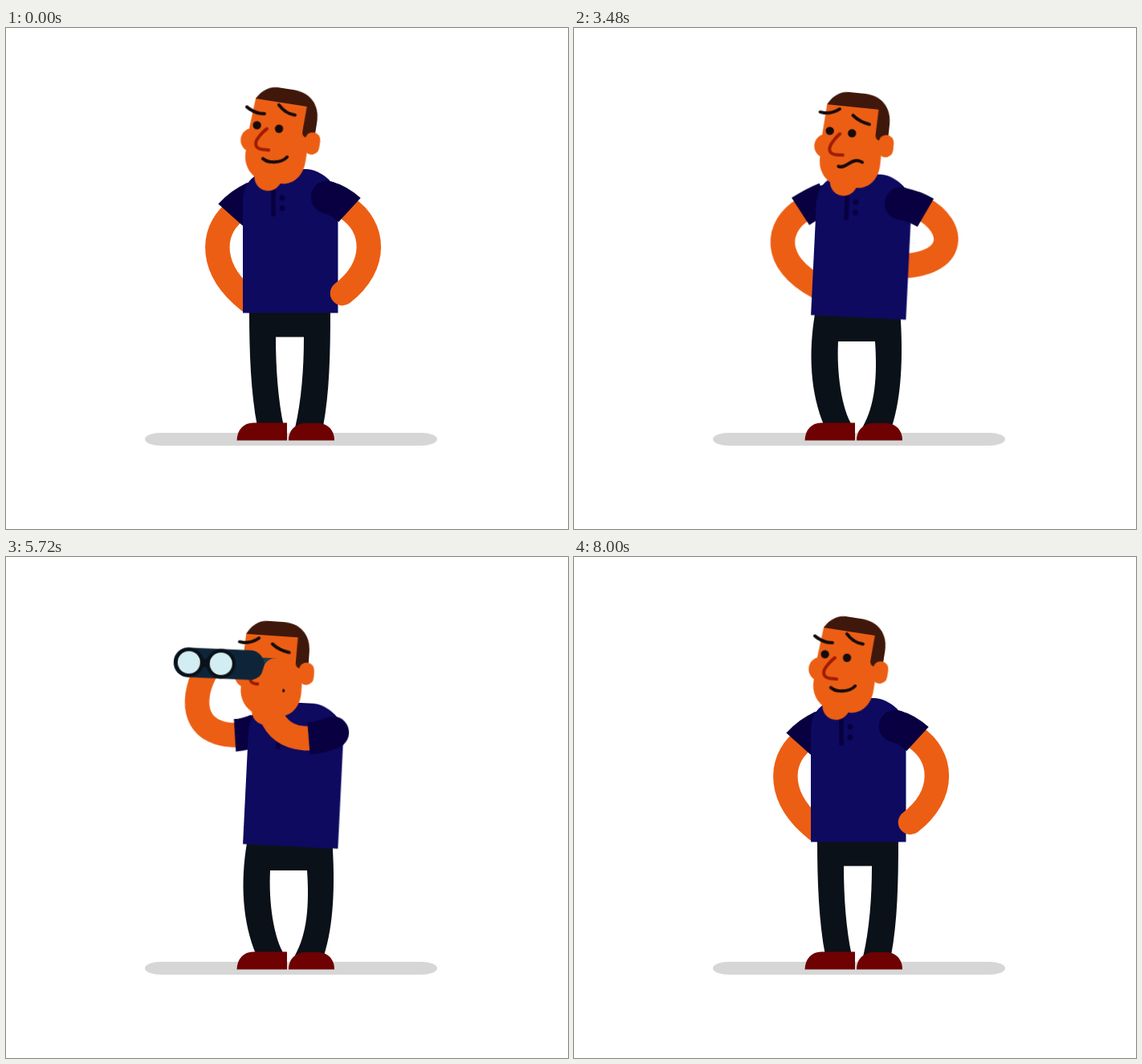
Write an HTML page without scripts that moves like this. It is 700x625 px and loops after 8480 ms.

```html
<!DOCTYPE html>
<html lang="en">
<head>
<meta charset="utf-8">
<title>Looking out</title>
<style>
html, body { margin: 0; width: 100%; height: 100%; overflow: hidden; background: #fff; }
svg { display: block; width: 700px; height: 625px; }

.skin { fill: #ec5e14; }
.limb { fill: none; stroke: #ec5e14; stroke-width: 30.5; stroke-linecap: round; }
.cuff { fill: none; stroke: #080040; stroke-width: 40.5; }
.navy { fill: #0d0a60; }
.dark { fill: #080040; }
.shoe { fill: #6e0202; }
.line { fill: none; stroke: #160b0b; stroke-width: 4; stroke-linecap: round; stroke-linejoin: round; }

/* one shared clock */
.torso, .legs, .head, .armL, .armR, .cuffL, .cuffR, .browL, .browR, .mouth, .bino, .pupils {
  animation: 8.48s ease-in-out infinite;
}
.front, .back, .binoFront, .binoBack, .eyes, .open, .shut { animation: 8.48s step-end infinite; }

.torso { transform-origin: 354px 355.5px; animation-name: torso; }
.legs { animation-name: legs; }
.head { animation-name: head; }
.armL { animation-name: armL; }
.armR { animation-name: armR; }
.cuffL { animation-name: cuffL; }
.cuffR { animation-name: cuffR; }
.browL { animation-name: browL; }
.browR { animation-name: browR; }
.mouth { animation-name: mouth; }
.bino { animation-name: bino; }
.pupils { animation-name: pupils; }
.front { animation-name: front; }
.back { animation-name: back; }
.binoFront { animation-name: binoFront; }
.binoBack { animation-name: binoBack; }
.eyes { animation-name: eyes; }
.open { animation-name: open; }
.shut { animation-name: shut; }

@keyframes torso {
  0%, .3%, 93.9%, 100% { transform: translate(0, 0) rotate(0deg); }
  8%, 11%, 26.4%, 82% { transform: translate(0, 5.5px) rotate(2.8deg); }
  14.9%, 21% { transform: translate(0, 5.5px) rotate(.9deg); }
}
@keyframes legs {
  0%, .3%, 93.9%, 100% { d: path("M303 353C303 405 305 455 313 497L346 497C339 465 336 425 336 385.5L371 385.5C371 425 368 465 360 499L395 497C403 455 404 405 404 353Z"); }
  8%, 82% { d: path("M300 357C292 405 294 455 312 497L347 497C333 475 327 430 329 391L375 391C378 435 375 470 360 497L396 497C408 460 410 410 406.5 357Z"); }
}
@keyframes head {
  0%, .3%, 93.9%, 100% { transform: translate(325.9px, 186.5px) rotate(8.9deg); }
  8%, 10.6%, 26.4%, 34% { transform: translate(324.5px, 193.3px) rotate(2.7deg); }
  14.6%, 20.8% { transform: translate(319.9px, 197.9px) rotate(-8deg); }
  43%, 49% { transform: translate(336.5px, 192.7px) rotate(6.2deg); }
  55.6%, 62% { transform: translate(322.5px, 193.3px) rotate(2.7deg); }
  75%, 82% { transform: translate(322.7px, 191.7px) rotate(6.1deg); }
}
@keyframes armL {
  0%, .3%, 93.9%, 100% { d: path("M284 230C254 256 254 302 302 340"); }
  8%, 47%, 90.5% { d: path("M280 224C246 246 242 292 302 320"); }
  51.4%, 86% { d: path("M278 224C232 240 222 270 244 262"); animation-timing-function: linear; }
  53.8%, 84.4% { d: path("M279 222C222 232 218 200 238 190"); animation-timing-function: ease-out; }
  55.7%, 82.1% { d: path("M282 220C220 224 222 170 241 138"); }
}
@keyframes cuffL {
  0%, .3%, 93.9%, 100% { d: path("M308 212Q292 219 279.5 233"); }
  8%, 47%, 90.5% { d: path("M306 209Q291 216 275.7 227"); }
  55.7%, 82.1% { d: path("M306 212Q292 219 278.4 220.5"); }
}
@keyframes armR {
  0%, .3%, 93.9%, 100% { d: path("M424 224C460 248 464 296 419 331"); }
  8%, 32% { d: path("M426 219C467 240 471 288 419 319"); }
  37.2%, 91.5% { d: path("M428 213C480 225 504 280 440 305"); animation-timing-function: linear; }
  40.6%, 42.9%, 89.6% { d: path("M427 216C470 235 480 290 385 290"); }
  46.2% { d: path("M428 209C470 208 505 250 475 300"); }
  48.6% { d: path("M428 211C468 216 496 262 465 309"); }
  51.4%, 85.8% { d: path("M412 232C446 262 440 292 398 277"); animation-timing-function: linear; }
  53.8%, 84.4% { d: path("M394 234C385 268 345 262 335 215"); animation-timing-function: ease-out; }
  55.7%, 82.1% { d: path("M377 219C339 225 305 201 325 137"); }
  87.7% { d: path("M426 216C470 222 490 262 457 288"); }
}
@keyframes cuffR {
  0%, .3%, 93.9%, 100% { d: path("M400 211Q415 215 428 227"); }
  8%, 32%, 40.6%, 42.9%, 89.6% { d: path("M400 211Q417 213.5 431.5 221"); }
  46.2%, 48.6% { d: path("M400 211Q417 208 433 211.5"); }
  51.4%, 85.8% { d: path("M400 211Q411 224 414 238"); animation-timing-function: linear; }
  53.8%, 84.4% { d: path("M400 211Q400 226 390 240"); animation-timing-function: ease-out; }
  55.7%, 82.1% { d: path("M400 211Q386 218 370.4 220"); }
  87.7% { d: path("M400 211Q417 210 432 217"); }
}
@keyframes browL {
  0%, .3%, 93.9%, 100% { d: path("M-9.2 12Q2 19 13.8 17"); }
  8%, 10.6%, 26.4%, 82% { d: path("M-7.5 10.4Q5.6 12.7 16.2 4.2"); }
  14.6%, 20.8% { d: path("M-5.8 19.4Q10 21.6 17.2 14"); }
}
@keyframes browR {
  0%, .3%, 93.9%, 100% { d: path("M29.9 3.4Q39.5 13 51.6 12.7"); }
  8%, 10.6%, 26.4%, 82% { d: path("M33.5 10.4Q43 18 55 19.4"); }
  14.6%, 20.8% { d: path("M33 2.6Q41 10.8 54 11.1"); }
}
@keyframes mouth {
  0%, .3%, 93.9%, 100% { d: path("M20.5 72.7C28 77.5 44 75 50 66"); }
  8%, 82% { d: path("M22 75.5C32 79 37 61 51 67.5"); }
}
@keyframes bino {
  0%, 42.9% { transform: translate(392px, 300px) rotate(-93deg); }
  46.2% { transform: translate(479px, 314px) rotate(-115deg); }
  48.6% { transform: translate(469px, 324px) rotate(-93.5deg); }
  51.4%, 85.8% { transform: translate(402px, 287px) rotate(-40deg); animation-timing-function: linear; }
  53.8%, 84.4% { transform: translate(342px, 220px) rotate(-15deg); animation-timing-function: ease-out; }
  55.7% { transform: translate(334px, 141px) rotate(1deg); }
  57.3%, 62% { transform: translate(336px, 141px) rotate(0deg); }
  75%, 82.1% { transform: translate(337.6px, 136.4px) rotate(7deg); }
  87.7% { transform: translate(462px, 300px) rotate(-150deg); }
  89.6%, 100% { transform: translate(392px, 300px) rotate(-120deg); }
}
@keyframes pupils {
  0%, 62% { transform: translate(0, 0); }
  64%, 69% { transform: translate(4px, 0); }
  71.5%, 79.5% { transform: translate(-4.6px, -1.4px); }
  81.5%, 100% { transform: translate(0, 0); }
}
@keyframes front {
  0%, 47.2%, 91.5% { visibility: visible; }
  37.2%, 88.7% { visibility: hidden; }
  100% { visibility: visible; }
}
@keyframes back {
  0%, 47.2%, 91.5% { visibility: hidden; }
  37.2%, 88.7% { visibility: visible; }
  100% { visibility: hidden; }
}
@keyframes binoFront {
  0%, 88.7%, 100% { visibility: hidden; }
  47.2% { visibility: visible; }
}
@keyframes binoBack {
  0%, 47.2%, 89.4%, 100% { visibility: hidden; }
  44.4%, 88.7% { visibility: visible; }
}
@keyframes eyes {
  0%, 83.5%, 100% { opacity: 1; }
  55.2% { opacity: 0; }
}
@keyframes open {
  0%, 70%, 81.8%, 100% { opacity: 0; }
  59.4%, 71.5% { opacity: 1; }
}
@keyframes shut {
  0%, 59.4%, 71.5%, 83%, 100% { opacity: 0; }
  55.6%, 70%, 81.8% { opacity: 1; }
}
</style>
</head>
<body>
<svg viewBox="0 0 700 625">
  <defs>
    <g id="lens">
      <circle r="18.5" fill="#0b1118"/>
      <circle r="14" fill="#d2eef3"/>
      <path class="shut" d="M-5.500 -1C-5 7 7 7 8 -1" fill="none" stroke="#3a2326" stroke-width="3" stroke-linecap="round"/>
      <g class="open"><circle class="pupils" r="7.2" fill="#38211f"/></g>
    </g>
    <!-- origin is the holding hand -->
    <g id="bino">
      <rect x="-20" y="-13" width="20" height="20" fill="#1d3f4a"/>
      <rect x="-128" y="-21.500" width="113" height="37" rx="18" fill="#0e2539"/>
      <path d="M-95 -11Q-89 -5 -83 -11V5Q-89 -1 -95 5Z" fill="#0b1118"/>
      <use href="#lens" x="-109" y="-3"/>
      <use href="#lens" x="-69" y="-3"/>
    </g>
  </defs>

  <rect x="173" y="505" width="364" height="16" rx="20" ry="8" fill="#d6d6d6"/>

  <!-- behind the body -->
  <g class="binoBack"><use class="bino" href="#bino"/></g>
  <g class="torso">
    <g class="back"><path class="limb armR" d="M424 224C460 248 464 296 419 331"/></g>
    <path class="limb armL" d="M284 230C254 256 254 302 302 340"/>
    <circle class="dark" cx="307" cy="211" r="19"/>
    <path class="cuff cuffL" d="M308 212Q292 219 279.500 233"/>
  </g>

  <path class="legs" fill="#0b1118" d="M303 353C303 405 305 455 313 497L346 497C339 465 336 425 336 385.500L371 385.500C371 425 368 465 360 499L395 497C403 455 404 405 404 353Z"/>
  <path class="shoe" d="M287.500 514.500C288 501 296 492.500 308 492.500H350V514.500Z"/>
  <path class="shoe" d="M352 514.500C352 501 361 493 374 493H388C401 493 409 502 409 514.500Z"/>

  <g class="torso">
    <path class="navy" d="M295 355.500V217C295 198 303 186 322 178Q334 176 350 176H374C390 177 405 188 413.500 205V355.500Z"/>
    <path d="M333 198V235" stroke="#080040" stroke-width="5.500"/>
    <circle class="dark" cx="344" cy="212" r="3.400"/>
    <circle class="dark" cx="344" cy="225" r="3.400"/>
  </g>

  <g class="head">
    <g transform="translate(-30 -95)">
      <circle class="skin" cx="4.400" cy="51.800" r="15"/>
      <circle class="skin" cx="30.500" cy="94.500" r="17"/>
      <path class="skin" d="M0 0H68V30H73.500V68C73.500 88 61 100 47 100H22C8 96 -2 84 -2 68V36Z"/>
      <path fill="#3f180b" d="M0 0C5 -10 14 -17.500 25 -18H46C66 -18 80 -4 80 16V34H73Q71 39 69 38.500Q64 37 64 32L64.600 0Z"/>
      <rect class="skin" x="68.700" y="30.400" width="19" height="28" rx="9.500"/>
      <g class="eyes" fill="#160b0b">
        <circle cx="6.800" cy="32.600" r="5.200"/>
        <circle cx="34.600" cy="32.800" r="5.200"/>
      </g>
      <path d="M19.700 35C14 41 9.500 49 8.800 53Q8 61.500 18 61.500L26 61" fill="none" stroke="#a01c00" stroke-width="4" stroke-linecap="round"/>
      <path class="line browL" d="M-9.200 12Q2 19 13.800 17"/>
      <path class="line browR" d="M29.900 3.400Q39.500 13 51.600 12.700"/>
      <path class="line mouth" d="M20.500 72.700C28 77.500 44 75 50 66"/>
    </g>
  </g>

  <g class="binoFront"><use class="bino" href="#bino"/></g>
  <g class="torso">
    <g class="front"><path class="limb armR" d="M424 224C460 248 464 296 419 331"/></g>
    <circle class="dark" cx="400" cy="211" r="20.200"/>
    <path class="cuff cuffR" d="M400 211Q415 215 428 227"/>
  </g>
</svg>
</body>
</html>
```
